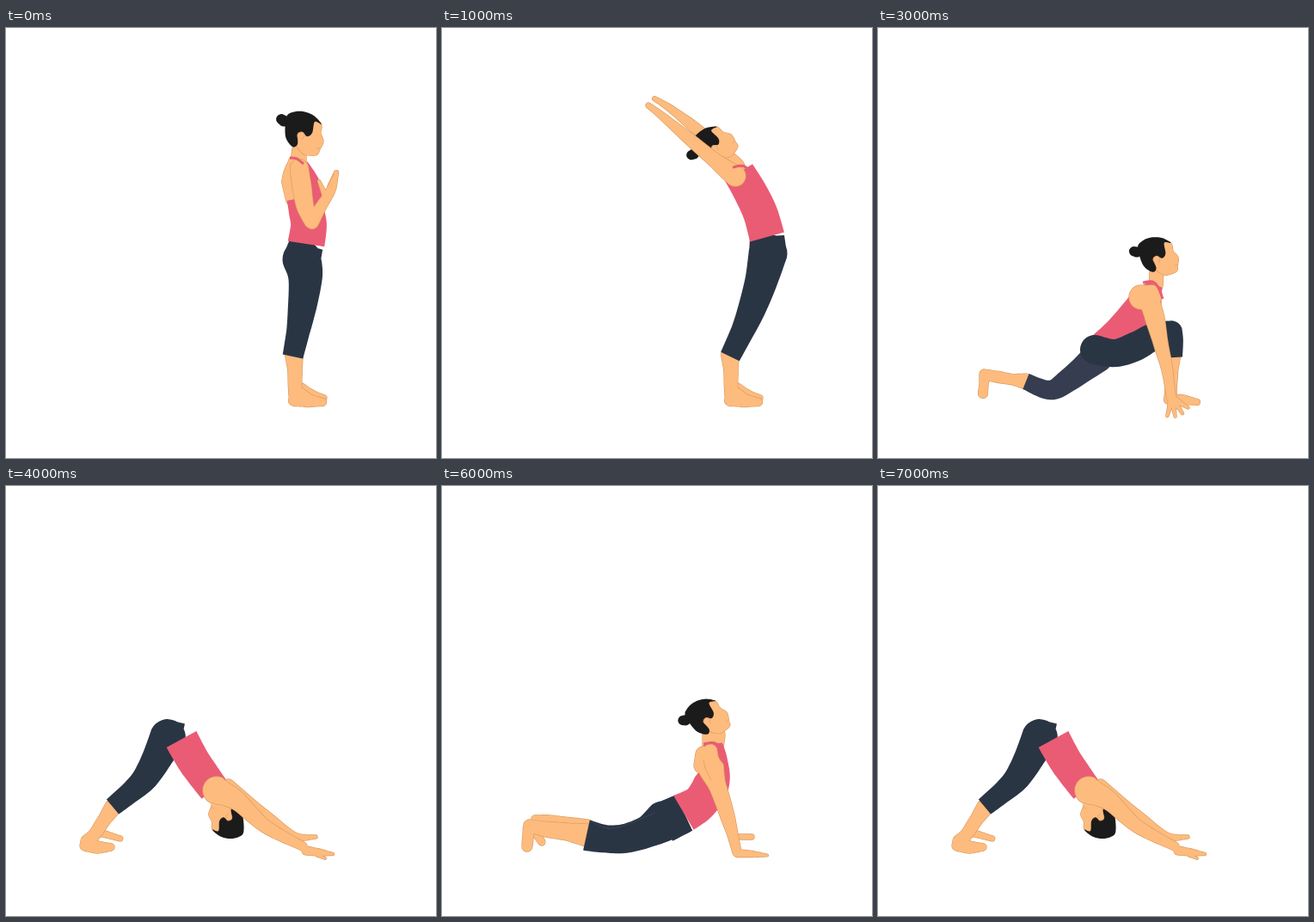
Write an HTML page that moves like this. It is 500 by 500 pixels and loops after 8000 ms.

```html
<!DOCTYPE html>
<html lang="en">
<head>
<meta charset="utf-8">
<title>Sun salutation</title>
<style>
html, body { margin: 0; width: 100%; height: 100%; overflow: hidden; background: #fff; }
svg { display: block; width: 100vw; height: 100vh; }
</style>
</head>
<body>
<svg id="stage" viewBox="0 0 500 500"></svg>
<script>
const HOLD = 1000;
const EDGE = '#d99a5f';
const fills = { skin: '#fdbb7e', pink: '#ea5c74', navy: '#2a3544', slate: '#363d50', hair: '#1c1b1b' };
const stage = document.getElementById('stage');

// Half widths along each body part, from the trunk outwards.
const LEG = [22.5, 19, 16.5, 13.5, 12];
const KNEELING = [24, 18.5, 17, 16, 18];
const SHIN = [10, 8, 7.5, 7.5];
const FOOT = [6.5, 7.5, 4.5];
const TORSO = [21.5, 21, 20.5, 19.5];
const ARM = [12, 11.5, 9, 7.5, 6, 5.5];
const UPPER = [10.5, 11, 10, 8];
const FORE = [7.5, 6.5, 5.5, 5, 2.5];
const PALM = [5, 4, 1.5];

const points = text => text.split(' ').map(p => p.split(',').map(Number));
const lerp = (a, b, u) => a + (b - a) * u;

function along(list, u) {
  const s = u * (list.length - 1), i = Math.min(Math.floor(s), list.length - 2);
  return lerp(list[i], list[i + 1], s - i);
}

// Catmull-Rom spline through the joints, as a dense polyline.
function spline(joints, closed) {
  const n = joints.length, steps = 10, out = [];
  const at = i => joints[closed ? (i + n) % n : Math.max(0, Math.min(n - 1, i))];
  for (let i = 0; i < (closed ? n : n - 1); i++) {
    const [a, b, c, d] = [at(i - 1), at(i), at(i + 1), at(i + 2)];
    for (let k = 0; k < steps; k++) {
      const t = k / steps;
      out.push([0, 1].map(j => b[j] + t / 2 * (c[j] - a[j]
        + t * (2 * a[j] - 5 * b[j] + 4 * c[j] - d[j]
        + t * (3 * (b[j] - c[j]) + d[j] - a[j])))));
    }
  }
  if (!closed) out.push(at(n - 1));
  return out;
}

const trace = list => list.map(p => p.map(v => v.toFixed(2)).join(' ')).join('L');

// Sweeps a changing width along a spline; the ends are round or flat.
function sweep(kind, widths, text, scale = 1, caps = [true, true]) {
  const mid = spline(points(text));
  const run = [0];
  for (let i = 1; i < mid.length; i++) {
    run.push(run[i - 1] + Math.hypot(mid[i][0] - mid[i - 1][0], mid[i][1] - mid[i - 1][1]));
  }
  const left = [], right = [];
  mid.forEach(([x, y], i) => {
    const a = mid[Math.max(0, i - 1)], b = mid[Math.min(mid.length - 1, i + 1)];
    const dx = b[0] - a[0], dy = b[1] - a[1], len = Math.hypot(dx, dy);
    const r = scale * along(widths, run[i] / run[mid.length - 1]) / len;
    left.push([x - dy * r, y + dx * r]);
    right.unshift([x + dy * r, y - dx * r]);
  });
  const join = (on, r) => on ? `A${r * scale} ${r * scale} 0 0 0 ` : 'L';
  const d = 'M' + trace(left) + join(caps[1], widths[widths.length - 1])
    + trace(right) + join(caps[0], widths[0]) + trace([left[0]]) + 'Z';
  return { kind, d };
}

const skin = (widths, text, scale) => sweep('skin', widths, text, scale);
const cloth = (kind, widths, text, scale) => sweep(kind, widths, text, scale, [false, false]);
const leg = (text, scale, widths = LEG, kind = 'navy') => sweep(kind, widths, text, scale, [true, false]);
const seat = text => cloth('navy', [22, 20], text);
const torso = (text, scale) => cloth('pink', TORSO, text, scale);
const far = part => ({ ...part, far: true });
const stroke = (text, color = EDGE, width = 0.7) => ({ line: color, width, d: 'M' + trace(spline(points(text))) });
const strap = text => stroke(text, fills.pink, 3);

function hand(x, y, from, to, reach, count) {
  return Array.from({ length: count }, (_, i) => {
    const a = lerp(from, to, i / (count - 1)) * Math.PI / 180;
    return skin([4, 2.5, 1.5], `${x},${y} ${x + reach * Math.cos(a)},${y + reach * Math.sin(a)}`);
  });
}

// Upright head facing right, then turned into place.
function head(x, y, turn, scale = 0.94, bun = true) {
  const place = `translate(${x} ${y}) rotate(${turn}) scale(${scale})`;
  const blob = (kind, text) => ({ kind, place, d: 'M' + trace(spline(points(text), true)) + 'Z' });
  const list = [
    blob('skin', '13,-13 18,-12 22,-6 21,2 24,12 20,21 17,27 9,28 0,26 -8,14 -6,0'),
    blob('hair', '-19,-16 -12,-22 0,-23 13,-18 22,-8 14,-11 11,2 5,6 0,1 -6,3 -6,15 -12,18 -20,6'),
    { ...stroke('-5,10 -6,4 -1,1 2,5 -1,10'), place },
    { ...stroke('16,20 20,20'), place }
  ];
  return bun ? [...list, { ...sweep('hair', [6, 6.5], '-25,-14 -22,-12'), place }] : list;
}

const standing = [
  far(skin([3, 4, 3], '344,416 356,425 370,430')),
  skin(SHIN, '335,380 336,400 336,415 337,430', 1.03),
  skin(FOOT, '335,433 348,433 368,435'),
  skin([7, 6], '337,422 350,430')
];

const kneeling = [
  far(skin([5, 3.5, 4], '170,393 130,387 108,387')),
  far(skin([5, 4], '110,404 116,414')),
  skin([13, 10, 9, 7], '168,406 145,402 120,399 102,395'),
  skin([6.5, 6], '101,397 99,419')
];

const prayer = [
  standing,
  leg('344,269 348,292 342,340 333.5,382'),
  seat('344,269 349,252'),
  skin([9, 16, 15], '337,157 336,172 340,196'),
  skin([8, 9], '341,140 340,156'),
  cloth('pink', [14, 9, 4], '353,201 356,182 347,157'),
  torso('349,251 352,229 349,212 346,197'),
  head(345, 120, 0, 1),
  skin([3, 1.5], '370,192 364,178'),
  skin(UPPER, '341,163 344,185 348,208 355,225'),
  skin(FORE, '356,226 366,208 377,190 384,168'),
  stroke('374,184 378,176 382,169'),
  strap('330,151 338,152 346,158')
];

const raised = [
  standing,
  far(skin([7, 6, 2.5], '328,143 270,97 247,82')),
  leg('379,262 370,298 355,340 335,382'),
  seat('379,262 378,242'),
  skin([11, 8], '341,162 325,143'),
  head(314, 136, -55),
  torso('378,243 370,215 358,190 345,168', 0.96),
  skin([12, 8, 7, 5, 3], '341,172 315,152 258,104 240,90'),
  strap('338,162 352,161 364,176')
];

const fold = [
  far(skin([5, 3], '350,423 364,426')),
  skin(SHIN, '339,380 339,400 339,425'),
  skin(FOOT, '338,433 350,433 369,435'),
  far(skin([6, 5], '358,377 346,412')),
  skin([10, 7], '366,341 360,352'),
  sweep('hair', [9, 11, 8, 7.5, 8.5], '360,366 368,361 391,363'),
  leg('328,272 333,303 341,345 340,382'),
  seat('328,271 350,274'),
  torso('350,274 363,287 378,308 387,317'),
  skin(ARM, '390,311 390,330 371,373 358,402 346,437', 1.03),
  hand(345, 439, 20, 55, 26, 3)
];

const lunge = [
  skin([9, 6, 6.5, 6], '172,411 152,408 124,403'),
  skin([6, 5, 5.5], '124,404 123,415 122,425'),
  leg('255,383 222,409 200,421 172,411', 0.8, LEG, 'slate'),
  skin([7.5, 5.5, 6.5, 7], '344,382 343,400 341,415 340,430'),
  skin(FOOT, '337,432 352,432 371,435', 0.75),
  skin([8, 8], '324,283 323,300'),
  torso('262,374 278,359 294,341 314,315', 0.96),
  cloth('pink', [17, 9], '314,315 322,298'),
  leg('252,374 276,378 300,370 320,359 341,353', 1, [17, 16, 17, 16, 13]),
  leg('341,353 344,365 345,383', 1, [13, 10.5, 9]),
  skin([14, 12], '306,313 318,311'),
  skin(ARM, '316,318 322,338 330,372 336,396 341,430', 0.96),
  hand(342, 430, 32, 105, 22, 4),
  head(324, 264, -20),
  strap('308,296 319,295 326,302 331,315')
];

const dog = [
  far(skin([4, 3], '112,404 133,410')),
  skin(SHIN, '124,374 113,390 103,405 94,413', 0.94),
  skin(FOOT, '92,418 107,420 122,420', 0.95),
  leg('188,292 181,306 168,330 155,347 124,373', 0.93),
  cloth('navy', [19, 18.5], '188,291 204,294.5'),
  far(skin([9, 8.5, 7, 5, 2], '258,350 283,371 305,387 335,407 360,408')),
  skin([8, 8], '254,366 252,376'),
  head(258, 390, 173, 0.88, false),
  torso('204,294.5 217,318 228,334 242,353', 0.92),
  skin([16, 15], '245,354 247,355'),
  skin([14, 10, 8, 6.5, 5], '250,356 270,367 302,396 345,419'),
  skin(PALM, '349,424 364,426 380,428'),
  skin([2, 1.2], '362,429 371,433')
];

const eightLimbs = [
  kneeling,
  leg('260,356 238,380 216,410 192,411 168,405', 0.93, KNEELING),
  seat('258,357 276,361'),
  skin([13, 12], '356,402 383,405'),
  torso('274,360 295,375 322,398 348,407'),
  head(395, 399, 10),
  skin(UPPER, '352,396 332,388 310,384', 0.8),
  skin(FORE.slice(0, 3), '309,385 328,408 340,428', 0.85),
  skin(PALM, '341,430 358,432 377,433', 0.8),
  strap('350,388 361,394 363,410')
];

const cobra = [
  kneeling,
  leg('258,390 238,402 212,410 188,410 168,406', 1, KNEELING),
  cloth('navy', [24, 23], '258,391 281.5,380'),
  stroke('173,390 200,398 248,380', '#414a5c'),
  far(skin([3, 3], '343,408 360,408')),
  skin([13, 12], '316,290 315,304'),
  cloth('pink', [23, 21, 21, 16, 11], '281,380 301,367 315,342 317,318 315,300'),
  skin([9, 9], '304,312 302,325'),
  skin([8, 15, 10, 9, 8, 6, 5], '312,308 312,325 325,362 336,398 343,426'),
  skin(PALM, '343,427 360,428 378,429.5', 0.9),
  head(306.5, 268.5, -38),
  strap('304,300 317,299 327,308 331,325'),
  stroke('304,319 307,330 313,342')
];

function node(attrs) {
  const p = document.createElementNS('http://www.w3.org/2000/svg', 'path');
  for (const k in attrs) if (attrs[k] !== undefined) p.setAttribute(k, attrs[k]);
  return p;
}

// Neighbouring parts of one kind share a single outline.
function merge(parts) {
  const out = [];
  for (const p of parts) {
    const last = out[out.length - 1];
    if (last && p.kind && last.kind === p.kind && last.far === p.far && last.place === p.place) last.d += p.d;
    else out.push({ ...p });
  }
  return out;
}

function build(pose) {
  const g = document.createElementNS('http://www.w3.org/2000/svg', 'g');
  for (const { kind, d, place, line, width } of merge(pose.flat())) {
    if (line) g.append(node({ d, transform: place, fill: 'none', stroke: line, 'stroke-width': width }));
    if (kind === 'skin') g.append(node({ d, transform: place, fill: 'none', stroke: EDGE, 'stroke-width': 1.3 }));
    if (kind) g.append(node({ d, transform: place, fill: fills[kind] }));
  }
  stage.append(g);
  return g;
}

const groups = [prayer, raised, fold, lunge, dog, eightLimbs, cobra, dog].map(build);

function draw(ms) {
  const now = Math.floor(ms / HOLD) % groups.length;
  groups.forEach((g, i) => g.setAttribute('display', i === now ? 'inline' : 'none'));
}

const start = performance.now();
function tick() {
  draw(performance.now() - start);
  requestAnimationFrame(tick);
}
tick();
</script>
</body>
</html>
```
